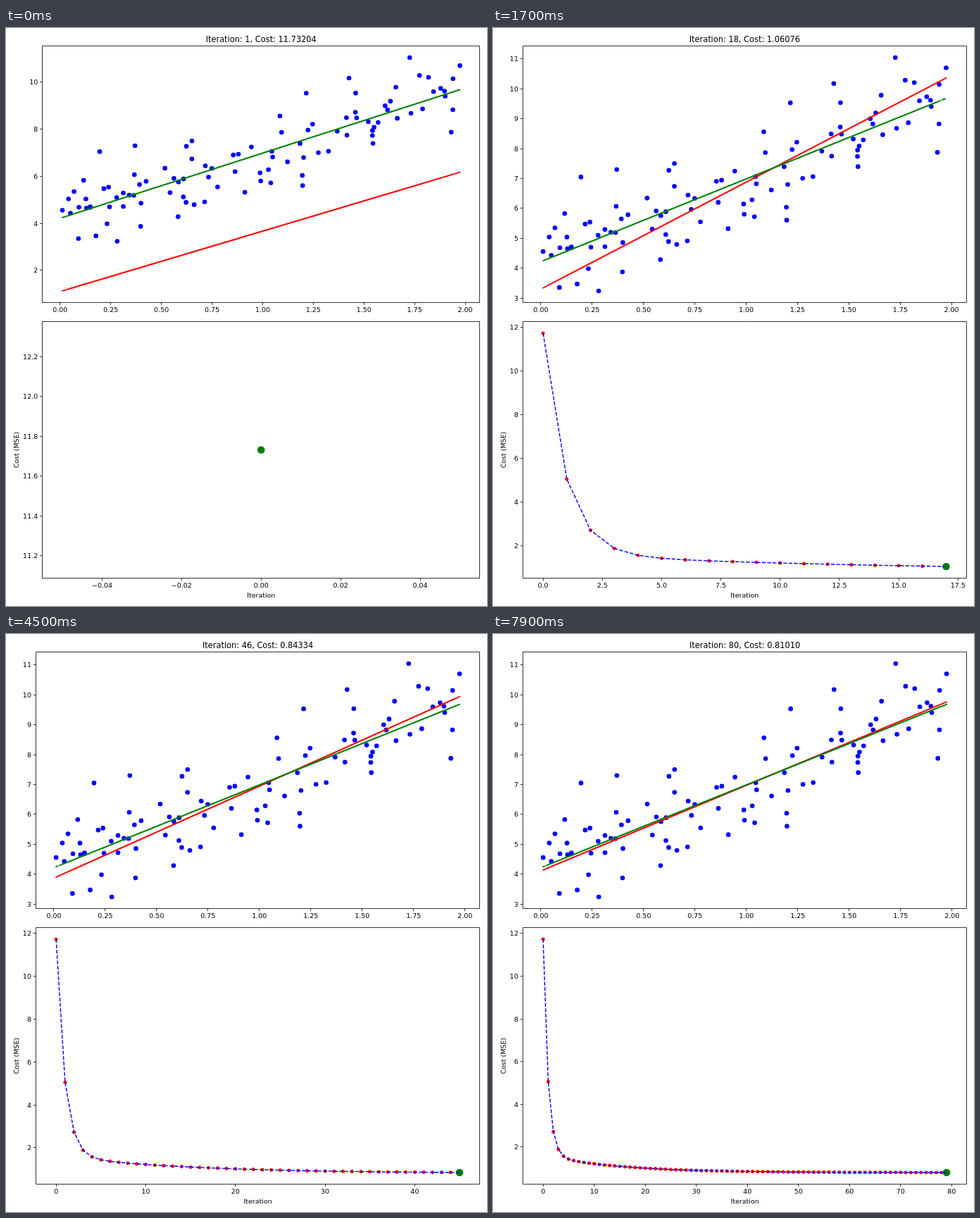
An HTML page with a canvas for the animation above (8000 ms loop, 683x820 px).

```html
<!DOCTYPE html>
<html lang="en">
<head>
<meta charset="utf-8">
<title>Gradient descent</title>
<style>
  html, body { margin: 0; width: 100%; height: 100%; overflow: hidden; background: #fff; }
  canvas { display: block; }
</style>
</head>
<body>
<canvas id="stage" width="683" height="820"></canvas>
<script>
const ctx = document.getElementById('stage').getContext('2d');
const STEPS = 80, STEP_MS = 100, RATE = 0.1;
const DASH = [5.27, 2.28];
const SMALL = '9.486px "DejaVu Sans", sans-serif';
const LARGE = '11.383px "DejaVu Sans", sans-serif';

// Mersenne Twister with a polar-method normal generator
const state = new Uint32Array(624);
state[0] = 42;
for (let i = 1; i < 624; i++) {
  state[i] = Math.imul(1812433253, state[i - 1] ^ (state[i - 1] >>> 30)) + i;
}
let pos = 0, spare = null;

function nextInt() {
  const next = (pos + 1) % 624;
  let y = (state[pos] & 0x80000000) | (state[next] & 0x7fffffff);
  state[pos] = state[(pos + 397) % 624] ^ (y >>> 1) ^ (y & 1 ? 0x9908b0df : 0);
  y = state[pos];
  pos = next;
  y ^= y >>> 11;
  y ^= (y << 7) & 0x9d2c5680;
  y ^= (y << 15) & 0xefc60000;
  return (y ^ (y >>> 18)) >>> 0;
}

function uniform() {
  const hi = nextInt() >>> 5, lo = nextInt() >>> 6;
  return (hi * 67108864 + lo) / 9007199254740992;
}

function normal() {
  if (spare !== null) {
    const value = spare;
    spare = null;
    return value;
  }
  let a, b, r;
  do {
    a = 2 * uniform() - 1;
    b = 2 * uniform() - 1;
    r = a * a + b * b;
  } while (r >= 1 || r === 0);
  const f = Math.sqrt(-2 * Math.log(r) / r);
  spare = f * a;
  return f * b;
}

const mean = list => list.reduce((sum, v) => sum + v, 0) / list.length;

// Noisy samples and their least-squares line
const xs = Array.from({ length: 100 }, () => 2 * uniform());
const ys = xs.map(x => 4 + 3 * x + normal());
const mx = mean(xs), my = mean(ys);
const bestSlope = mean(xs.map((x, i) => (x - mx) * (ys[i] - my))) / mean(xs.map(x => (x - mx) ** 2));
const best = xs.map(x => my + bestSlope * (x - mx));

// Gradient descent history
const fits = [], costs = [];
let bias = normal(), slope = normal();
for (let k = 0; k < STEPS; k++) {
  const errors = xs.map((x, i) => bias + slope * x - ys[i]);
  bias -= RATE * 2 * mean(errors);
  slope -= RATE * 2 * mean(errors.map((e, i) => e * xs[i]));
  const fit = xs.map(x => bias + slope * x);
  fits.push(fit);
  costs.push(mean(fit.map((v, i) => (v - ys[i]) ** 2)));
}

// Axis limits with 5% margins
function limits(values) {
  let lo = Math.min(...values), hi = Math.max(...values);
  if (lo === hi) {
    const pad = 0.05 * (Math.abs(lo) || 1);
    lo -= pad;
    hi += pad;
  }
  const margin = 0.05 * (hi - lo);
  return [lo - margin, hi + margin];
}

function ticks([lo, hi]) {
  const raw = (hi - lo) / 9;
  const unit = 10 ** Math.floor(Math.log10(raw));
  const step = unit * [1, 2, 2.5, 5, 10].find(s => s * unit >= raw * (1 - 1e-9));
  let digits = 0;
  while (Math.abs(step * 10 ** digits - Math.round(step * 10 ** digits)) > 1e-6) digits++;
  const list = [];
  for (let i = Math.ceil(lo / step); i * step <= hi; i++) {
    list.push({ value: i * step, label: (i * step).toFixed(digits).replace('-', '\u2212') });
  }
  return list;
}

const snap = v => Math.floor(v) + 0.5;

function text(str, x, y, align = 'center', font = SMALL) {
  ctx.font = font;
  ctx.textAlign = align;
  ctx.fillStyle = '#000';
  ctx.fillText(str, x, y);
}

function makeAxes(left, right, top, bottom, xLim, yLim) {
  return {
    left, right, top, bottom, xLim, yLim,
    x: v => left + (v - xLim[0]) / (xLim[1] - xLim[0]) * (right - left),
    y: v => bottom - (v - yLim[0]) / (yLim[1] - yLim[0]) * (bottom - top)
  };
}

function dots(ax, px, py, diameter, color) {
  ctx.fillStyle = color;
  px.forEach((v, i) => {
    ctx.beginPath();
    ctx.arc(ax.x(v), ax.y(py[i]), diameter / 2, 0, 2 * Math.PI);
    ctx.fill();
  });
}

function line(ax, px, py, width, color, dash = []) {
  ctx.beginPath();
  px.forEach((v, i) => ctx.lineTo(ax.x(v), ax.y(py[i])));
  ctx.strokeStyle = color;
  ctx.lineWidth = width;
  ctx.lineJoin = 'round';
  ctx.setLineDash(dash);
  ctx.stroke();
  ctx.setLineDash([]);
}

function frame(ax) {
  const l = snap(ax.left), r = snap(ax.right);
  ctx.strokeStyle = '#000';
  ctx.lineWidth = 0.8;
  ctx.lineJoin = 'miter';
  ctx.beginPath();
  ctx.rect(l, ax.top, r - l, ax.bottom - ax.top);
  for (const t of ticks(ax.xLim)) {
    const x = ax.x(t.value);
    ctx.moveTo(snap(x), ax.bottom);
    ctx.lineTo(snap(x), ax.bottom + 3.5);
    text(t.label, x, ax.bottom + 13.8);
  }
  for (const t of ticks(ax.yLim)) {
    const y = ax.y(t.value);
    ctx.moveTo(l, snap(y));
    ctx.lineTo(l - 3.5, snap(y));
    text(t.label, ax.left - 6.6, y + 3.5, 'right');
  }
  ctx.stroke();
}

// A wide last tick label pushes the right edge inwards
function rightEdge(xLim) {
  const last = ticks(xLim).pop();
  ctx.font = SMALL;
  const room = (xLim[1] - last.value) / (xLim[1] - xLim[0]) * 529;
  return 672.7 - Math.max(0, ctx.measureText(last.label).width / 2 - room);
}

function draw(k) {
  ctx.fillStyle = '#fff';
  ctx.fillRect(0, 0, 683, 820);

  const history = costs.slice(0, k + 1);
  const index = history.map((_, i) => i);
  const indexLim = limits(index);
  const left = k ? 42.5 : 51.8, right = rightEdge(indexLim);
  const middle = (left + right) / 2;

  const data = makeAxes(left, right, 25.5, 389.5, limits(xs), limits([...ys, ...best, ...fits[k]]));
  dots(data, xs, ys, 6.64, '#00f');
  line(data, xs, fits[k], 1.9, '#f00');
  line(data, xs, best, 1.9, '#008000', DASH);
  frame(data);
  text(`Iteration: ${k + 1}, Cost: ${costs[k].toFixed(5)}`, middle, 19.9, 'center', LARGE);

  const cost = makeAxes(left, right, 416.5, 780.5, indexLim, limits(history));
  dots(cost, index, history, 5, '#f00');
  dots(cost, [k], [costs[k]], 10.6, '#008000');
  line(cost, index, history, 1.42, '#00f', DASH);
  frame(cost);
  text('Iteration', middle, 808);
  ctx.save();
  ctx.translate(18, 598.5);
  ctx.rotate(-Math.PI / 2);
  text('Cost (MSE)', 0, 0);
  ctx.restore();
}

const start = performance.now();
let shown = -1;
function tick() {
  const k = Math.floor((performance.now() - start) / STEP_MS) % STEPS;
  if (k !== shown) draw(shown = k);
  requestAnimationFrame(tick);
}
tick();
</script>
</body>
</html>
```
